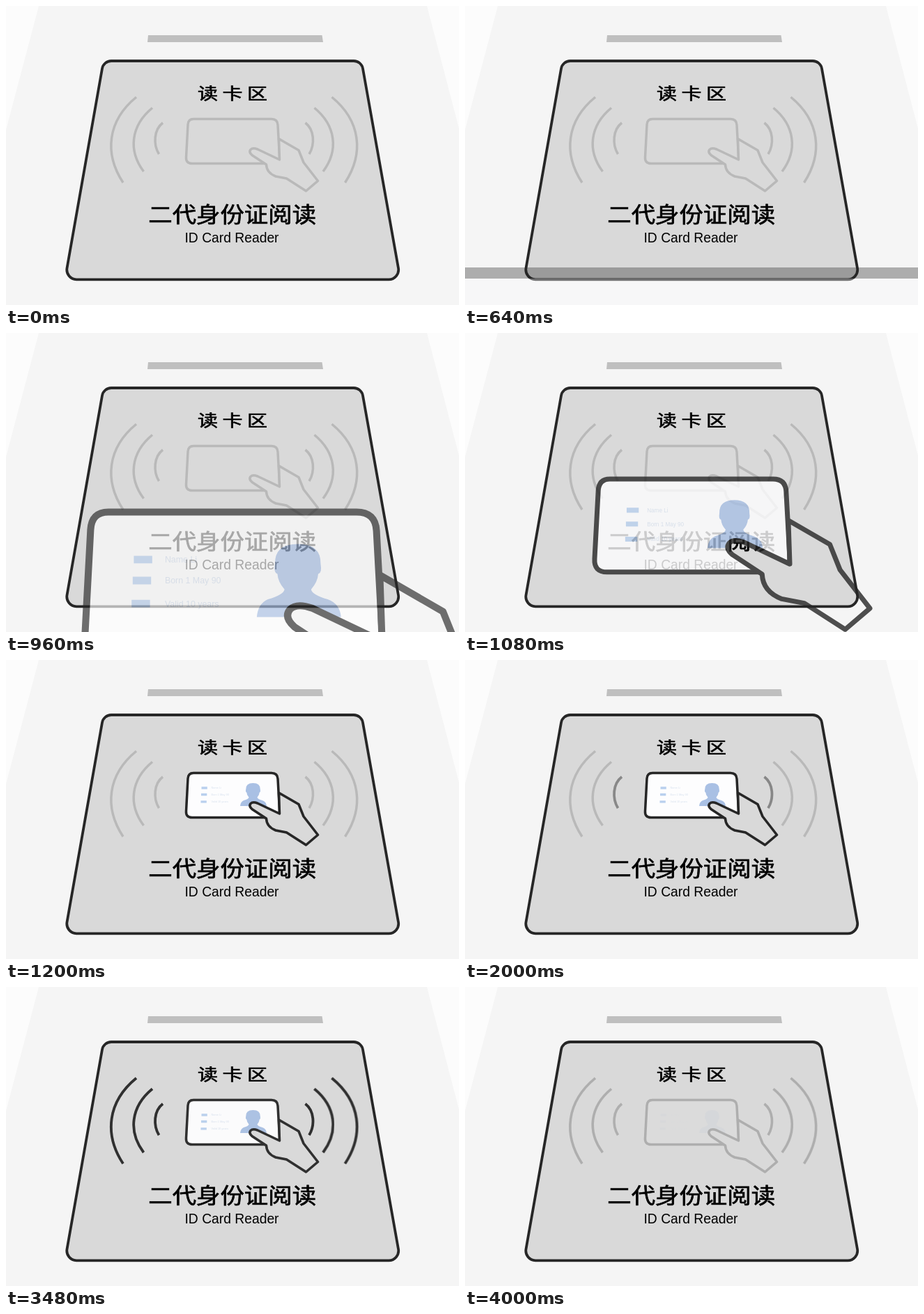
Animation of 650x430 px, one loop 4040 ms. Source, as an HTML page:

```html
<!DOCTYPE html>
<html lang="zh">
<head>
<meta charset="utf-8">
<title>Card reader</title>
<style>
  html, body { margin: 0; width: 100%; height: 100%; overflow: hidden; }
  svg { display: block; width: 100%; height: 100%; }
  .line { fill: none; stroke-linejoin: round; stroke-linecap: butt; }
  .pale { stroke: #b9b9b9; stroke-width: 3.5; }
  .dark { stroke: #262626; stroke-width: 3.8; }
  .label { font-family: "Noto Sans CJK SC", "Noto Sans CJK", sans-serif; font-weight: 500; stroke: #000; stroke-width: .8; }
  .latin { font-family: "Liberation Sans", Arial, sans-serif; font-size: 19.3px; }
  .tiny { font-family: "Liberation Sans", Arial, sans-serif; font-size: 3.9px; fill: #d6e0ee; }
</style>
</head>
<body>
<svg viewBox="0 0 650 430">
  <defs>
    <path id="card" d="M269 162.5H381Q389.5 162.5 390 171L392.5 217Q393 226.5 383.5 226.5H267Q258 226.5 258.5 217.5L261 170.5Q261.5 162.5 269 162.5Z"/>
    <path id="hand" d="M447.5 251.5L427 225L420 207.5L391.5 191L392.5 221L361 206Q354 203.5 351 206.5Q348 210 353 214.5L373.5 228Q374 240 387 245L402.5 248L430.5 266Z"/>
    <mask id="grip" maskUnits="userSpaceOnUse" x="250" y="150" width="160" height="90">
      <rect x="250" y="150" width="160" height="90" fill="#fff"/>
      <use href="#hand" fill="#000"/>
    </mask>
    <g id="arc0">
      <path id="inner" d="M225 168C212 178 211 199 219.5 213"/>
      <use href="#inner" transform="matrix(-1 0 0 1 654.5 0)"/>
    </g>
    <g id="arc1">
      <path id="middle" d="M210 146.5C179 172 175 208 197.5 238"/>
      <use href="#middle" transform="matrix(-1 0 0 1 652.5 0)"/>
    </g>
    <g id="arc2">
      <path id="outer" d="M187 131C145.5 165 140.500 212 168 254"/>
      <use href="#outer" transform="matrix(-1 0 0 1 654.5 0)"/>
    </g>
  </defs>

  <!-- Reader -->
  <rect width="650" height="430" fill="#fcfcfc"/>
  <path d="M47 0H604L650 176V430H0V178Z" fill="#f5f5f5"/>
  <path d="M204 42H453.500L455 52H203Z" fill="#bfbfbf"/>
  <path class="line dark" style="fill:#d9d9d9" d="M151 79H499A13.200 13.200 0 0 1 512 90L563 377A14 14 0 0 1 549 393.300H101A14 14 0 0 1 87.500 377L138 90A13.200 13.200 0 0 1 151 79Z"/>
  <g class="label">
    <text transform="translate(275 133.500) scale(1 .8)" font-size="29" letter-spacing="6.5">读卡区</text>
    <text transform="translate(204.300 311) scale(1 .9)" font-size="34.4">二代身份证阅读</text>
  </g>
  <text class="latin" x="256.500" y="339.500">ID Card Reader</text>

  <!-- Printed symbol -->
  <g class="line pale">
    <use href="#arc0"/><use href="#arc1"/><use href="#arc2"/>
    <use href="#card"/>
    <use href="#hand" fill="#d9d9d9"/>
  </g>

  <!-- Live symbol -->
  <g class="line dark">
    <use class="wave" href="#arc0"/>
    <use class="wave" href="#arc1"/>
    <use class="wave" href="#arc2"/>
  </g>
  <g id="holder" class="line" stroke="#262626">
    <g mask="url(#grip)">
      <use href="#card" fill="#fdfdfe"/>
      <g stroke="none">
        <path d="M280.500 182.300h8.300v3.400h-8.300zM280 191.800h8.300v3.400h-8.300zM279.500 202.200h8.300v3.400h-8.300z" fill="#b9d0ee"/>
        <g class="tiny">
          <text x="294.500" y="185.400">Name Li</text>
          <text x="294.500" y="194.900">Born 1 May 90</text>
          <text x="294.500" y="205.300">Valid 10 years</text>
        </g>
        <path d="M336 210Q336.500 204 341 202Q348 200 348.500 197.500Q345.500 194 345.300 190.500Q343.500 190 344.200 186Q344 177 354.500 177Q365 177 364.800 186Q365.500 190 363.700 190.500Q363.500 194 360.500 197.500Q361 200 368 202Q373.500 204 374 210Z" fill="#a9c0e4"/>
      </g>
    </g>
    <use href="#hand"/>
  </g>
</svg>
<script>
  const LOOP = 4040, STEP = 40;
  const ENTER = 520, LAND = 1200, FADE = 3440, FADE_TIME = 600;
  const WAVE_STARTS = [2000, 2160, 2400];
  const holder = document.getElementById("holder");
  const waves = document.querySelectorAll(".wave");
  const clamp = v => Math.min(1, Math.max(0, v));

  function draw(t) {
    const fade = 1 - clamp((t - FADE) / FADE_TIME);

    // The card shrinks linearly towards the symbol, measured back from landing.
    const left = Math.max(0, LAND - t);
    const scale = 1 + left * 2.18 / 240;
    const x = 325.5 + left / 240;
    const y = 161 + left * 0.382;
    const weight = 3.5 + left * 0.031 - left * left * 1.55e-5;
    const arrival = 1 - 0.34 * Math.pow(left / 240, 0.78);
    holder.setAttribute("transform", `translate(${x} ${y}) scale(${scale}) translate(-325.5 -161)`);
    holder.setAttribute("stroke-width", weight / scale);
    holder.setAttribute("opacity", t < ENTER ? 0 : clamp(arrival) * fade);

    waves.forEach((wave, i) =>
      wave.setAttribute("opacity", clamp((t - WAVE_STARTS[i] + STEP) / (3 * STEP)) * fade));
  }

  const start = performance.now();
  function tick() {
    const t = (performance.now() - start) % LOOP;
    draw(Math.floor(t / STEP) * STEP);
    requestAnimationFrame(tick);
  }
  tick();
</script>
</body>
</html>
```
